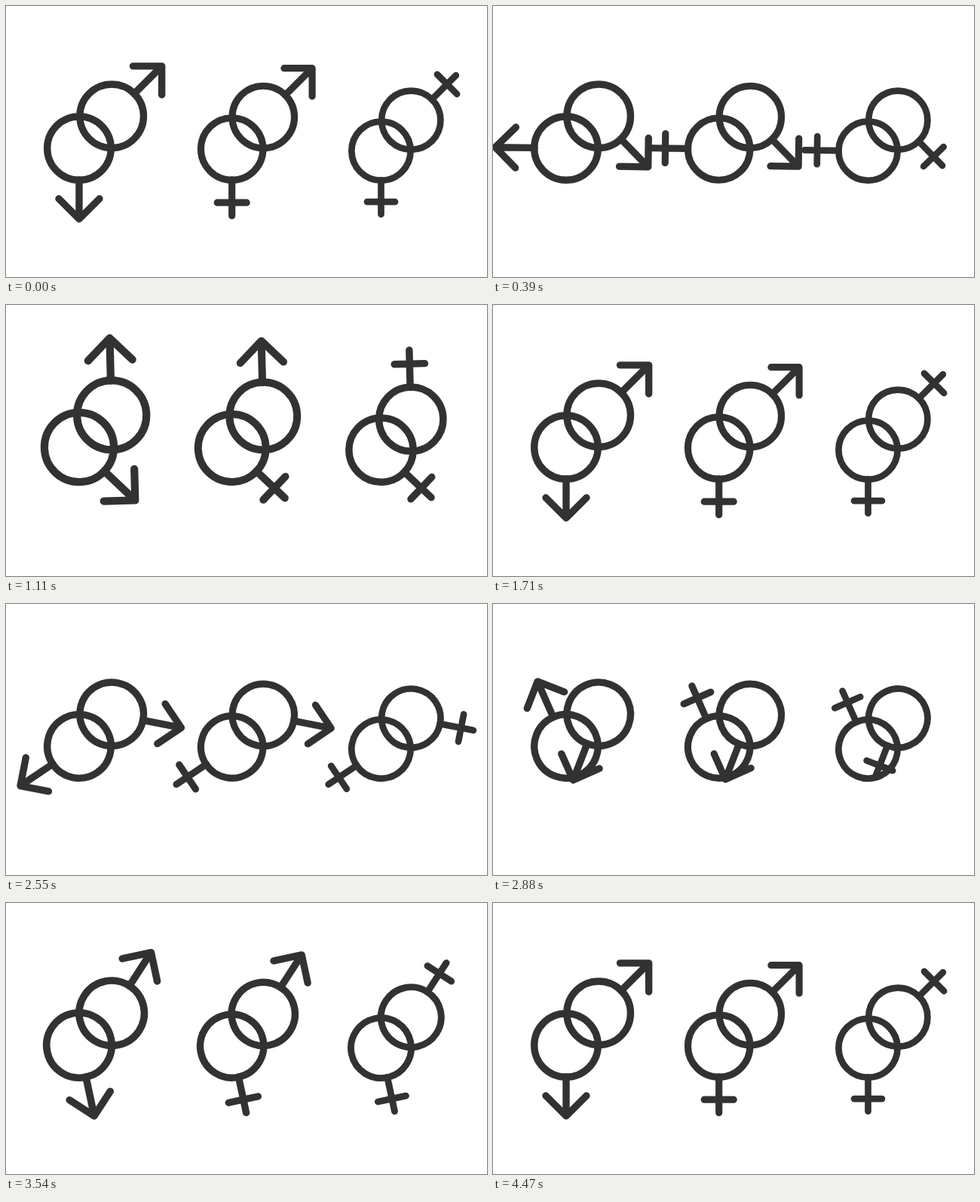
An HTML page that plays this animation: 638 by 360 pixels, repeating every 4500 ms.

```html
<!DOCTYPE html>
<html lang="en">
<head>
<meta charset="utf-8">
<title>Rotating gender symbols</title>
<style>
  html, body { margin: 0; width: 100%; height: 100%; overflow: hidden; background: #fff; }
  svg { display: block; width: 100%; height: 100%; }
  path, circle { fill: none; stroke: #323233; stroke-width: 9.4; stroke-linecap: round; stroke-linejoin: round; }
</style>
</head>
<body>
<svg id="stage" viewBox="0 0 638 360"></svg>
<script>
const LOOP = 4500;
const SPINS = [672, 2954];   // midpoint of each full turn, ms
const HALF = 650;            // half the length of a turn, ms

// Arms point right; each symbol turns about the centre of its ring.
const MALE = 'M42 0H94M67 -27L94 0L67 27';
const FEMALE = 'M42 0H91M73 -20V20';

// x, y, size, resting angle, arm
const symbols = [
  [140.2, 146.3, 1, -45, MALE],
  [97, 189, 1, 90, MALE],
  [341.3, 147.5, 0.975, -45, MALE],
  [299.7, 190, 0.975, 90, FEMALE],
  [537.3, 151.7, 0.925, -45, FEMALE],
  [497.5, 192.6, 0.925, 90, FEMALE]
];

const stage = document.getElementById('stage');
stage.innerHTML = symbols.map(s => `<g><circle r="42.3"/><path d="${s[4]}"/></g>`).join('');
const groups = [...stage.children];

const clamp = (v, lo, hi) => Math.min(hi, Math.max(lo, v));

function draw(t) {
  const u = (t - SPINS[t < 1900 ? 0 : 1]) / HALF;
  const v = clamp(u, -1, 1);
  const turn = 180 + 180 * (1.18 * v - 0.18 * v ** 3);
  // The rings swell briefly during the second half of the turn.
  const q = clamp((u - 0.1) / 0.95, 0, 1);
  const swell = 1 + 0.1 * Math.sin(Math.PI * q) ** 2;
  symbols.forEach(([x, y, size, angle], i) => {
    groups[i].setAttribute('transform',
      `translate(${x} ${y}) rotate(${angle + turn}) scale(${size * swell})`);
  });
}

const start = performance.now();
function tick() {
  draw((performance.now() - start) % LOOP);
  requestAnimationFrame(tick);
}
tick();
</script>
</body>
</html>
```
